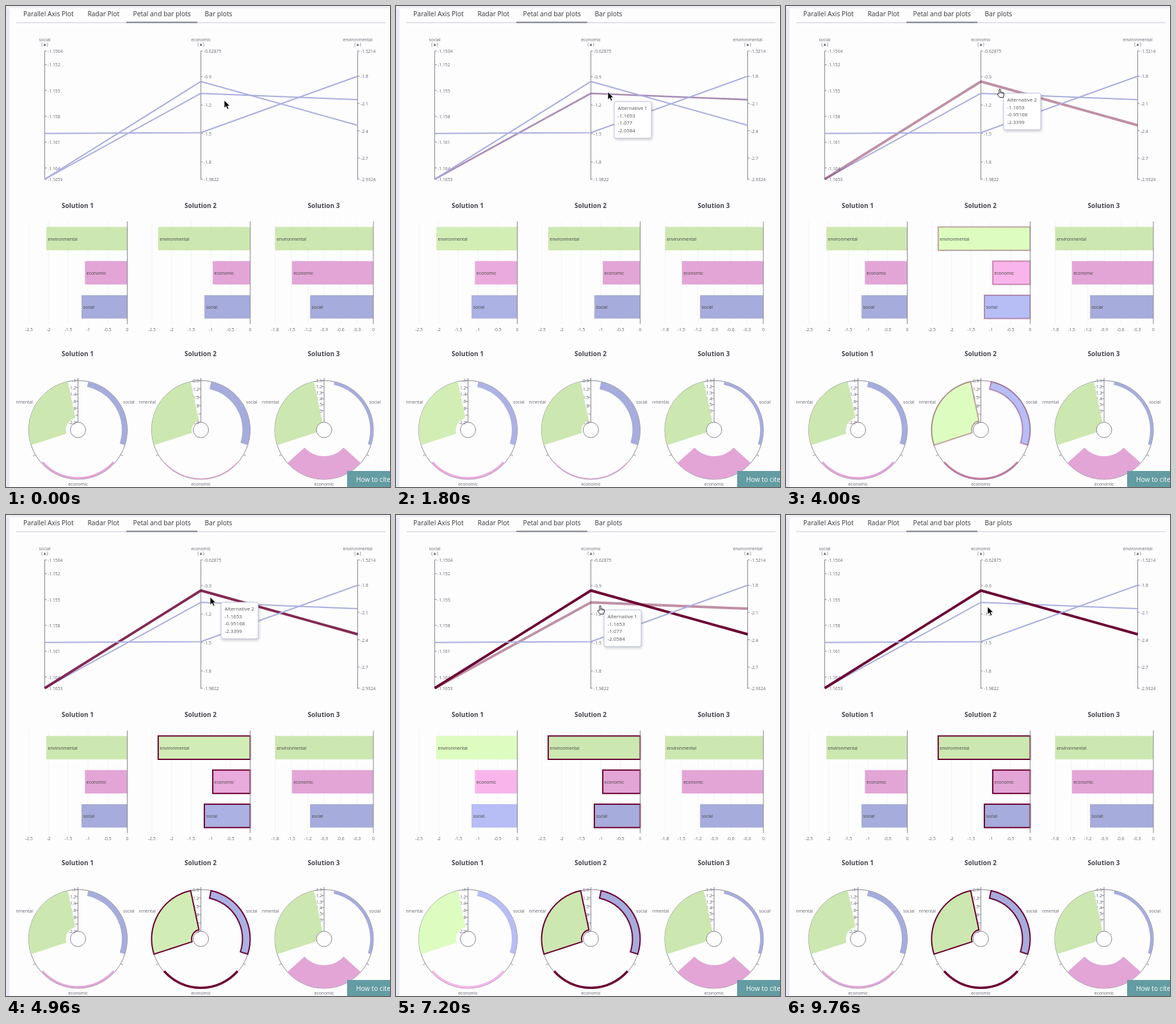
Write an HTML page that moves like this. It is 600 by 750 pixels and loops after 9800 ms.

```html
<!DOCTYPE html>
<html lang="en">
<head>
<meta charset="utf-8">
<title>Solution comparison</title>
<style>
html, body { margin: 0; width: 100%; height: 100%; overflow: hidden; background: #fefdfe; }
svg { display: block; width: 600px; height: 750px; font: 6.8px "Open Sans", "Noto Sans", sans-serif; }
text { fill: #666670; }
.tab { font-size: 10.3px; fill: #333338; }
.title { font-size: 10px; font-weight: 700; fill: #44444c; }
.bar { fill: #444; }
.axis { stroke: #85858c; fill: none; }
.grid { stroke: #f3f1f6; }
.tip text { font-size: 7.9px; fill: #55555c; }
.tip rect { fill: #fff; stroke: #bcc2de; filter: drop-shadow(1px 2px 2px rgba(0,0,0,.2)); }
.cite { font-size: 10.3px; fill: #fff; }
</style>
</head>
<body>
<svg id="stage" viewBox="0 0 600 750"></svg>
<script>
const stage = document.getElementById('stage');
const LOOP = 9800, DARK = [107, 0, 50], LINE = [169, 174, 222];
const names = ['environmental', 'economic', 'social'];
const base = [[204, 231, 176], [226, 165, 214], [166, 172, 219]];
const bright = [[221, 253, 192], [249, 181, 235], [183, 189, 245]];

const axes = [
  { x: 60.5, name: 'social', max: -1.1504, min: -1.1653, ticks: [-1.152, -1.155, -1.158, -1.161, -1.164] },
  { x: 304.5, name: 'economic', max: -0.62875, min: -1.9822, ticks: [-0.9, -1.2, -1.5, -1.8] },
  { x: 549.5, name: 'environmental', max: -1.5214, min: -2.9324, ticks: [-1.8, -2.1, -2.4, -2.7] }
];

// values: social, economic, environmental; radii: inner radius of each petal
const solutions = [
  { values: [-1.1653, -1.077, -2.0584], zero: 189.5, low: 2.5, step: 0.5, cx: 112.5,
    radii: [19, 73.5, 68.5], rings: ['-1', '-1.2', '-1.4', '-1.6', '-1.8', '', '-2.2'], gap: 10.8 },
  { values: [-1.1653, -0.95168, -2.3399], zero: 381.5, low: 2.5, step: 0.5, cx: 304.5,
    radii: [14.5, 75.5, 65], rings: ['-0.9', '-1.2', '-1.5', '-1.8', '', '-2.4'], gap: 13 },
  { values: [-1.16, -1.4915, -1.8], zero: 574, low: 1.8, step: 0.3, cx: 497,
    radii: [12, 41, 72], rings: ['-1.1', '-1.2', '-1.3', '-1.4', '-1.5', '-1.6'], gap: 9.4 }
];

function add(tag, attrs, parent = stage) {
  const el = document.createElementNS('http://www.w3.org/2000/svg', tag);
  set(el, attrs);
  parent.appendChild(el);
  return el;
}
function set(el, attrs) {
  for (const k in attrs) el.setAttribute(k, attrs[k]);
}
function label(str, x, y, cls = '', anchor = 'start', parent = stage) {
  const el = add('text', { x, y, class: cls, 'text-anchor': anchor }, parent);
  el.textContent = str;
  return el;
}
const path = (d, cls) => add('path', { d, class: cls });
const box = (x, y, width, height, fill) => add('rect', { x, y, width, height, fill });
const mix = (a, b, k) => `rgb(${a.map((v, i) => Math.round(v + (b[i] - v) * k))})`;

function polar(cx, r, deg) {
  const a = deg * Math.PI / 180;
  return `${(cx + r * Math.sin(a)).toFixed(2)} ${(661 - r * Math.cos(a)).toFixed(2)}`;
}
function sector(cx, r0, r1, a0, a1) {
  return `M${polar(cx, r1, a0)}A${r1} ${r1} 0 0 1 ${polar(cx, r1, a1)}` +
    `L${polar(cx, r0, a1)}A${r0} ${r0} 0 0 0 ${polar(cx, r0, a0)}Z`;
}

function drawFrame() {
  box(0, 0, 600, 3.5, '#eeeef3');
  box(0, 4, 5.5, 746, '#e9e9f5');
  [['Parallel Axis Plot', 27], ['Radar Plot', 127.5], ['Petal and bar plots', 198.5], ['Bar plots', 310.5]]
    .forEach(([s, x]) => label(s, x, 16, 'tab'));
  box(16, 25.5, 577, 1, '#c6c8d4');
  box(188, 24.5, 111, 2, '#7d808d');
}

function drawAxes() {
  axes.forEach(a => {
    a.y = v => 70 + 200 * (a.max - v) / (a.max - a.min);
    label(a.name, a.x, 54.5, '', 'middle');
    label('(▲)', a.x, 62, '', 'middle');
    path(`M${a.x} 70V271`, 'axis');
    [a.max, ...a.ticks, a.min].forEach(v => {
      path(`M${a.x} ${a.y(v)}h3`, 'axis');
      label(v, a.x + 4.5, a.y(v) + 3);
    });
  });
}

function drawLines() {
  solutions.forEach(s => {
    const pts = axes.map((a, i) => `${a.x},${a.y(s.values[i])}`).join(' ');
    s.line = add('polyline', { points: pts, fill: 'none', 'stroke-linejoin': 'bevel' });
  });
}

function drawBars(s, n) {
  const unit = 153.5 / s.low;
  label(`Solution ${n + 1}`, s.cx - .5, 315, 'title', 'middle');
  for (let i = 0; i <= Math.round(s.low / s.step); i++) {
    const v = +(i * s.step).toFixed(1), x = s.zero - v * unit;
    if (i) path(`M${x} 336V496`, 'grid');
    label(v ? -v : 0, x, 507, '', 'middle');
  }
  s.parts = names.map((name, i) => {
    const w = -s.values[2 - i] * unit, y = 344.5 + i * 53.2;
    const el = box(s.zero - w, y, w, 36.5);
    label(name, s.zero - w + 2.5, y + 21, 'bar');
    return { el, i };
  });
  path(`M${s.zero} 336V496`, 'axis');
}

function drawPetals(s, n) {
  const { cx } = s;
  label(`Solution ${n + 1}`, cx - .5, 545.5, 'title', 'middle');
  add('circle', { cx, cy: 661, r: 77, class: 'axis' });
  s.rings.forEach((r, i) => {
    const y = 584 + i * s.gap;
    path(`M${cx} ${y}h-4`, 'axis');
    label(r, cx - 3, y + 2.8, '', 'end');
  });
  s.radii.forEach((r, i) => {
    const from = 252 - i * 120;
    s.parts.push({ el: path(sector(cx, r, 77, from, from + 96)), i });
  });
  path(`M${cx} 584V649`, 'axis');
  add('circle', { cx, cy: 661, r: 12, class: 'axis' });
  [0, 120, 240].forEach(a => path(`M${polar(cx, 77, a)}L${polar(cx, 81, a)}`, 'axis'));
  label('nmental', cx - 70.5, 620, '', 'end');
  label('social', cx + 70.5, 620);
  label('economic', cx, 748, '', 'middle');
}

drawFrame();
drawAxes();
drawLines();
solutions.forEach(drawBars);
solutions.forEach(drawPetals);
box(533, 725, 67, 25, '#639ca2');
label('How to cite', 547, 742, 'cite');

const tip = add('g', { class: 'tip' });
add('rect', { width: 58, height: 57, rx: 3 }, tip);
const tipLines = [13, 24.5, 36, 47.5].map(y => label('', 5.5, y, '', 'start', tip));

const arrow = add('path', {
  d: 'M0 0V12L2.9 9.5L5 14L7 13L5 8.8H8.8Z', fill: '#000', stroke: '#fff', 'stroke-width': .7
});
const hand = add('path', {
  d: 'M-1 7V1Q-1-.7 0-.7T1.2 1V4.2Q2.5 3.6 3.3 4.6Q4.6 4.2 5.1 5.2Q6.5 5 6.5 6.5V9L5.3 12.5H-.3L-3.5 8Q-3.8 6.2-2.4 6.4Z' +
    'M1.2 4.2V6.5M3.3 4.6V6.8M5.1 5.2V7',
  fill: '#fff', stroke: '#111', 'stroke-width': .9
});

// [solution, start, end] of each pointer hover and selection
const hovers = [[0, 1400, 1710], [1, 2150, 4860], [0, 5900, 9300]];
const picks = [[1, 3960, Infinity], [0, 7200, 8900]];
const cursorPath = [
  [0, 341, 147], [1000, 339, 145], [1400, 335, 143], [1710, 335, 143], [1800, 331, 134],
  [2150, 334, 130], [4680, 334, 130], [4860, 330, 130], [4960, 319, 128], [5400, 318, 131],
  [5900, 323, 140], [6560, 322, 142], [7100, 319, 142], [8800, 319, 142], [9300, 317, 142],
  [9640, 315, 143], [9800, 315, 143]
];

const easeOut = k => 1 - (1 - Math.min(1, Math.max(0, k))) ** 3;

function amount(spans, n, t) {
  return Math.max(0, ...spans.filter(s => s[0] === n)
    .map(([, on, off]) => easeOut((t - on) / 300) * (1 - easeOut((t - off) / 300))));
}

function cursorAt(t) {
  const i = cursorPath.findIndex(p => p[0] > t);
  const [t0, x0, y0] = cursorPath[i - 1], [t1, x1, y1] = cursorPath[i];
  const k = (t - t0) / (t1 - t0);
  return [x0 + (x1 - x0) * k, y0 + (y1 - y0) * k];
}

function drawTip(t) {
  const h = hovers.filter(s => t >= s[1]).pop();
  const shown = h ? Math.min(1, (t - h[1]) / 150, (h[2] + 350 - t) / 150) : 0;
  set(tip, { opacity: Math.max(0, shown) });
  if (!h) return;
  const [x, y] = cursorAt(Math.min(t, h[2]));
  set(tip, { transform: `translate(${x + 6} ${y + 6})` });
  [`Alternative ${h[0] + 1}`, ...solutions[h[0]].values].forEach((s, i) => tipLines[i].textContent = s);
}

function render(t) {
  solutions.forEach((s, n) => {
    const hot = amount(hovers, n, t), picked = amount(picks, n, t), strong = Math.max(hot, picked);
    set(s.line, {
      stroke: mix(LINE, DARK, strong), 'stroke-width': 2 + 2 * strong, 'stroke-opacity': 1 - .57 * hot
    });
    s.parts.forEach(({ el, i }) => set(el, {
      fill: mix(base[i], bright[i], hot), stroke: mix(DARK, DARK, 0), 'stroke-width': 2, 'stroke-opacity': picked
    }));
  });
  drawTip(t);
  const [x, y] = cursorAt(t), over = hovers.some(([, on, off]) => t >= on && t < off);
  set(arrow, { transform: `translate(${x} ${y})`, visibility: over ? 'hidden' : 'visible' });
  set(hand, { transform: `translate(${x} ${y})`, visibility: over ? 'visible' : 'hidden' });
}

const start = performance.now();
function tick() {
  render((performance.now() - start) % LOOP);
  requestAnimationFrame(tick);
}
tick();
</script>
</body>
</html>
```
